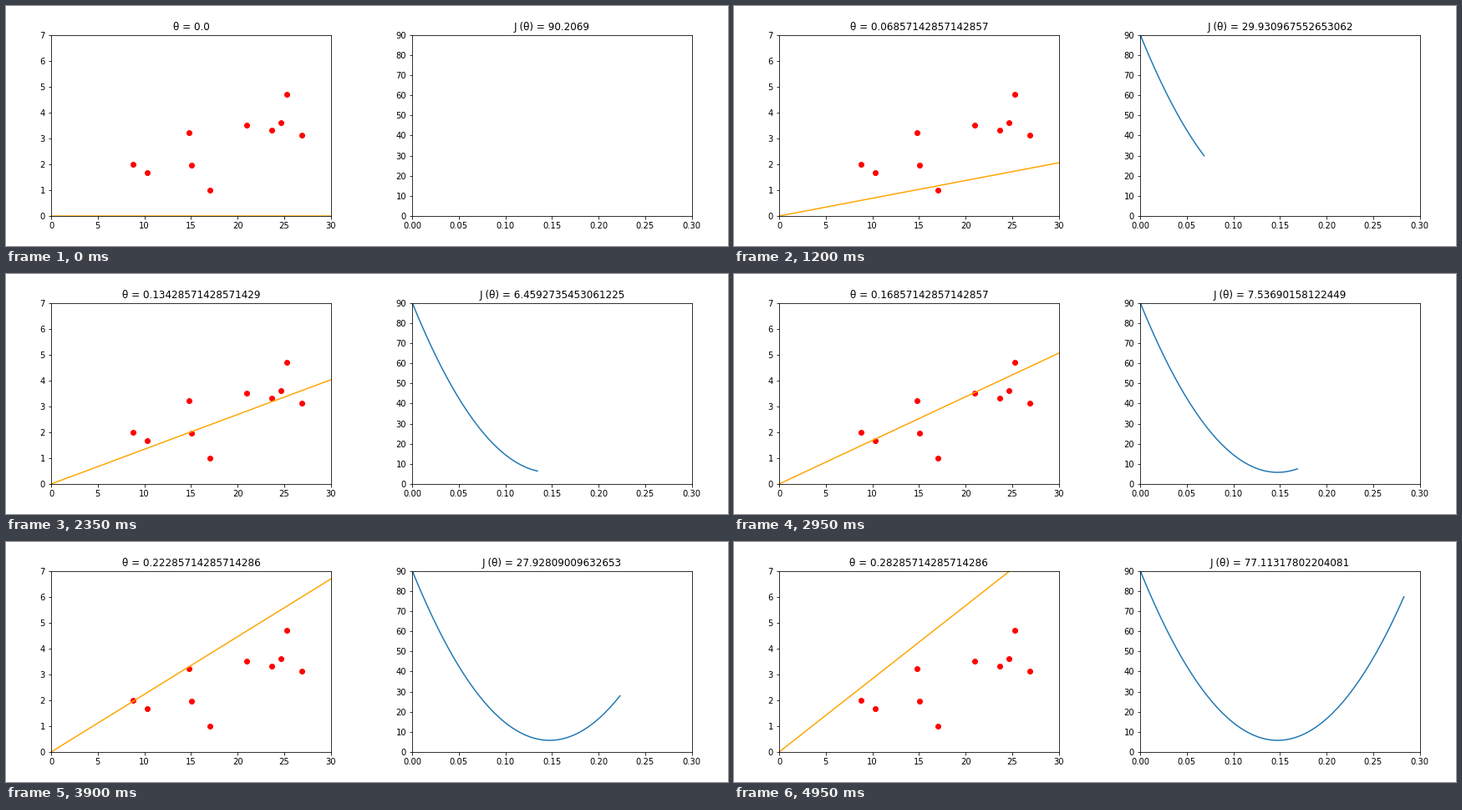
A matplotlib script that plays this animation: 864x288 px, repeating every 5 s.

```python
import numpy as np
import matplotlib.pyplot as plt
from matplotlib.animation import FuncAnimation

FRAMES, INTERVAL = 100, 50
STEPS = 350  # theta advances by 1/350 per frame

plt.rcParams["font.family"] = "DejaVu Sans"
plt.rcParams["font.size"] = 10

points_x = [8.8, 10.3, 14.8, 15.07, 17.05, 21.0, 23.7, 24.6, 25.28, 26.88]
points_y = [2.0, 1.67, 3.22, 1.96, 1.0, 3.51, 3.32, 3.61, 4.7, 3.12]


def cost(step):
    """Squared error 90.2069 - 1145.4986 t + 3886.0877 t^2 at t = step / 350.

    Integer arithmetic keeps the printed decimals free of rounding drift.
    """
    scaled = 902069 * STEPS**2 - 11454986 * STEPS * step + 38860877 * step**2
    return scaled / (10000 * STEPS**2)


def make_axes(fig, left, xticks, yticks):
    ax = fig.add_axes([left, 0.125, 0.3875, 0.755])
    ax.set_xticks(xticks)
    ax.set_yticks(yticks)
    ax.set_xlim(xticks[0], xticks[-1])
    ax.set_ylim(yticks[0], yticks[-1])
    return ax


fig = plt.figure(figsize=(12, 4), dpi=72, facecolor="white")
fit_ax = make_axes(fig, 0.0625, np.arange(0, 31, 5), np.arange(0, 8))
cost_ax = make_axes(fig, 0.5625, np.linspace(0, 0.3, 7), np.arange(0, 91, 10))

fit_ax.plot(points_x, points_y, "ro")
fit_line, = fit_ax.plot([], [], color="orange")
cost_line, = cost_ax.plot([], [], color="tab:blue")

thetas = [step / STEPS for step in range(FRAMES)]
costs = [cost(step) for step in range(FRAMES)]


def update(i):
    fit_line.set_data([0, 30], [0, 30 * thetas[i]])
    cost_line.set_data(thetas[:i + 1], costs[:i + 1])
    fit_ax.set_title(f"θ = {thetas[i]}", fontsize=12)
    cost_ax.set_title(f"J (θ) = {costs[i]}", fontsize=12)
    return fit_line, cost_line


anim = FuncAnimation(fig, update, frames=FRAMES, interval=INTERVAL, repeat=True)
plt.show()
```
